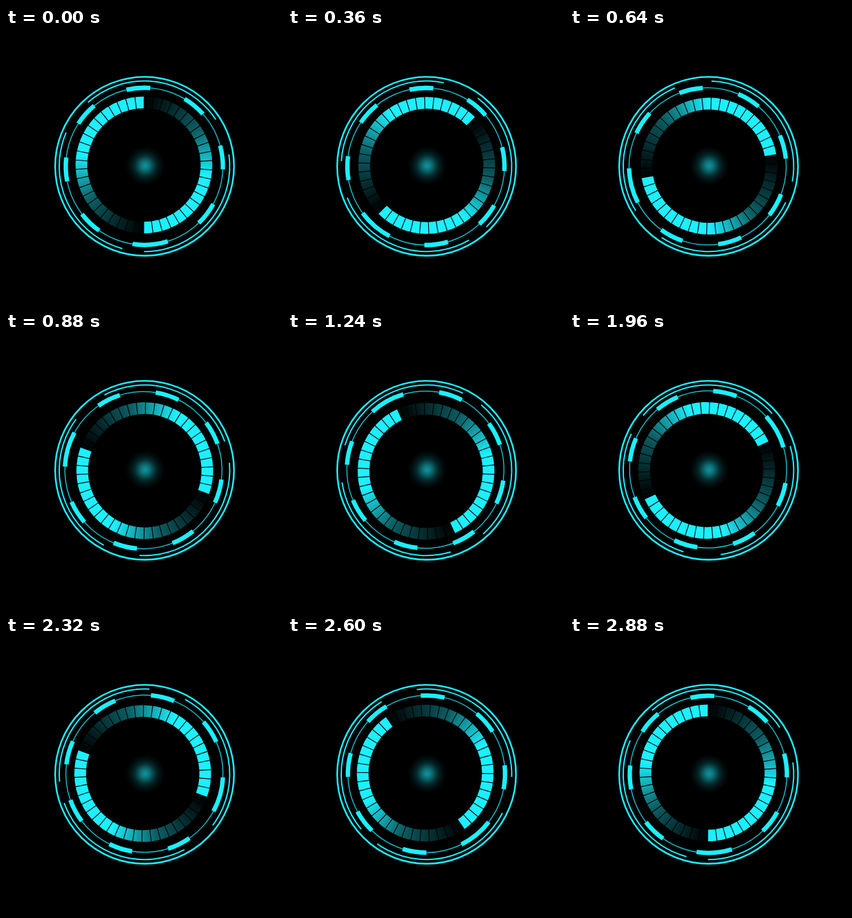
These frames come from a looping animation (425 by 425 pixels, 2920 ms). An HTML page with a canvas:

```html
<!DOCTYPE html>
<html lang="en">
<head>
<meta charset="utf-8">
<title>Radial loader</title>
<style>
html, body { margin: 0; width: 100%; height: 100%; overflow: hidden; background: #000; }
canvas { display: block; }
</style>
</head>
<body>
<canvas id="stage" width="425" height="425"></canvas>
<script>
const ctx = document.getElementById('stage').getContext('2d');
const CYAN = '#1cf0ff';
const STEP = 40, TURN = 2880, LOOP = 2920;
const rad = deg => deg * Math.PI / 180;
const cyan = alpha => `rgba(28,240,255,${alpha})`;

// Angles run clockwise from the top, in degrees.
function arc(radius, from, to, width, style = CYAN) {
  ctx.beginPath();
  ctx.arc(0, 0, radius, rad(from - 90), rad(to - 90));
  ctx.lineWidth = width;
  ctx.strokeStyle = style;
  ctx.stroke();
}

function layer(x, y, turn, draw) {
  ctx.save();
  ctx.translate(x, y);
  ctx.rotate(rad(turn));
  draw();
  ctx.restore();
}

function glow() {
  const g = ctx.createRadialGradient(0, 0, 0, 0, 0, 30);
  g.addColorStop(0, cyan(0.61));
  g.addColorStop(0.2, cyan(0.49));
  g.addColorStop(0.4, cyan(0.3));
  g.addColorStop(0.55, cyan(0.17));
  g.addColorStop(0.75, cyan(0.07));
  g.addColorStop(1, cyan(0));
  ctx.fillStyle = g;
  ctx.fillRect(-30, -30, 60, 60);
}

function thinArcs() {
  for (const start of [-41.5, 82, 195]) arc(131.3, start, start + 98.3, 2);
}

// The dashes and segments sit slightly off their pivots, so they wobble.
function dashes() {
  const gap = 26.44, size = 17.5, long = 162.6;
  ctx.translate(0.6, 0.6);
  arc(121, 0, 360, 1.5, cyan(0.8));
  arc(121, long, long + 26, 6.8);
  for (let i = 0; i < 7; i++) {
    const start = long + 26 + gap + i * (size + gap);
    arc(121, start, start + size, 6.8);
  }
}

function segments() {
  const count = 46;
  const g = ctx.createConicGradient(-Math.PI / 2, 0, 0);
  for (const half of [0, 0.5]) {
    g.addColorStop(half, cyan(0.02));
    g.addColorStop(half + 0.02, cyan(0.04));
    g.addColorStop(half + 0.16, cyan(0.4));
    g.addColorStop(half + 0.275, cyan(1));
    g.addColorStop(half + 0.5, cyan(1));
  }
  ctx.translate(0.3, -1.8);
  arc(96.3, 0, 360, 18, g);
  ctx.strokeStyle = '#000';
  ctx.lineWidth = 1.2;
  for (let i = 0; i < count; i++) {
    ctx.rotate(2 * Math.PI / count);
    ctx.beginPath();
    ctx.moveTo(0, -86);
    ctx.lineTo(0, -107);
    ctx.stroke();
  }
}

function frame() {
  const time = Math.floor(performance.now() % LOOP / STEP) * STEP;
  const turn = time / TURN * 360;
  ctx.fillStyle = '#000';
  ctx.fillRect(0, 0, 425, 425);
  layer(214.4, 212, 0, glow);
  layer(213.4, 212.9, 0, () => arc(137.7, 0, 360, 2.6));
  layer(213.2, 212.9, -turn, thinArcs);
  layer(212.4, 212.4, turn, dashes);
  layer(212.1, 212.7, turn + 0.2, segments);
  requestAnimationFrame(frame);
}
frame();
</script>
</body>
</html>
```
